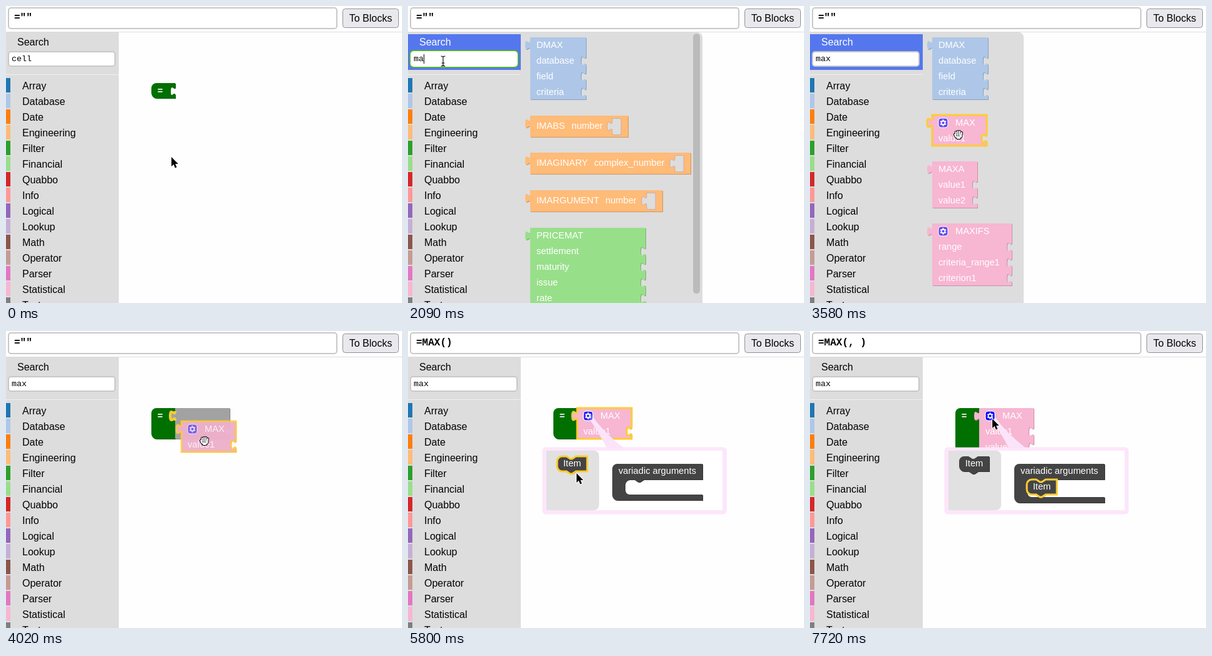
Recreate the animation shown at these times as an HTML page with a canvas. Size 632x474 px, loop 8000 ms.

```html
<!DOCTYPE html>
<html lang="en">
<head>
<meta charset="utf-8">
<title>Formula blocks</title>
<style>
html, body { margin: 0; width: 100%; height: 100%; overflow: hidden; background: #fff; }
canvas { display: block; width: 632px; height: 474px; }
</style>
</head>
<body>
<canvas id="stage" width="632" height="474"></canvas>
<script>
const ctx = document.getElementById('stage').getContext('2d');
const LOOP = 8000;
const SANS = '"Liberation Sans", Arial, sans-serif';
const MONO = '"Liberation Mono", "Courier New", monospace';
const BLOCK_FONT = `14.67px ${SANS}`;
const YELLOW = '#fc3', GREY = '#ddd', DARK = '#444';
const BLUE = '#aec7e8', ORANGE = '#ffbb78', LIME = '#98df8a', PINK = '#f7b6d2';

const categories = [
  ['Array', '#1f77b4'], ['Database', BLUE], ['Date', '#ff7f0e'],
  ['Engineering', ORANGE], ['Filter', '#2ca02c'], ['Financial', LIME],
  ['Quabbo', '#d62728'], ['Info', '#ff9896'], ['Logical', '#9467bd'],
  ['Lookup', '#c5b0d5'], ['Math', '#8c564b'], ['Operator', '#c49c94'],
  ['Parser', '#e377c2'], ['Statistical', PINK], ['Text', '#7f7f7f']
];

// Bursts of motion: first step, last step, number of steps.
const bursts = [[150, 1190, 8], [2680, 3580, 7], [3730, 4750, 8], [5500, 6540, 8], [6680, 7720, 8]];

// Key points: tick, x, y.
const cursorPath = [
  [0, 264, 241], [6, 56, 88], [8, 56, 88], [14, 236, 205], [15, 236, 205],
  [18, 316, 175], [19, 310, 166], [23, 289, 132], [26, 269, 227],
  [30, 374, 255], [32, 374, 255], [38, 291, 140], [39, 291, 140]
];
const maxPath = [[15, 195, 174], [18, 280, 144], [19, 270, 123]];
const itemPath = [[26, 238, 200], [30, 346, 237]];

const clamp = (v, lo, hi) => Math.min(hi, Math.max(lo, v));

function tickAt(t) {
  return bursts.reduce((sum, [from, to, n]) =>
    sum + clamp(Math.floor((t - from + 6) * (n - 1) / (to - from)) + 1, 0, n), 0);
}

function along(keys, tick) {
  const i = keys.findIndex(k => k[0] >= tick);
  if (i <= 0) return (i ? keys[keys.length - 1] : keys[0]).slice(1);
  const [a, b] = [keys[i - 1], keys[i]];
  const p = (tick - a[0]) / (b[0] - a[0]);
  const e = p * p * (3 - 2 * p);
  return [1, 2].map(k => Math.round(a[k] + (b[k] - a[k]) * e));
}

// Drawing helpers
function text(s, x, y, font, color = '#000', align = 'left') {
  ctx.font = font;
  ctx.fillStyle = color;
  ctx.textAlign = align;
  ctx.fillText(s, x, y);
}

function rect(x, y, w, h, color) {
  ctx.fillStyle = color;
  ctx.fillRect(x, y, w, h);
}

function round(x, y, w, h, r, fill, stroke, width = 1) {
  ctx.beginPath();
  ctx.roundRect(x, y, w, h, r);
  if (fill) { ctx.fillStyle = fill; ctx.fill(); }
  if (stroke) { ctx.strokeStyle = stroke; ctx.lineWidth = width; ctx.stroke(); }
}

function at(x, y, draw) {
  ctx.save();
  ctx.translate(x, y);
  draw();
  ctx.restore();
}

function strokePath(path, color, width) {
  ctx.strokeStyle = color;
  ctx.lineWidth = width;
  ctx.stroke(path);
}

// Block outlines
const TAB_DOWN = 'c0,10 -8,-8 -8,7.5s8,-2.5 8,7.5';
const TAB_UP = 'c0,-10 -8,8 -8,-7.5s8,2.5 8,-7.5';
const TOP_LEFT = 'M0,8a8,8 0 0 1 8,-8';
const NOTCH_BACK = 'l-6,4h-3l-6,-4';

function valuePath(w, rows, h = rows * 25 - 1) {
  let d = `M0,0H${w}`;
  for (let i = 1; i < rows; i++) d += `V${i * 25 + 5}${TAB_DOWN}`;
  return new Path2D(`${d}V${h}H0V20${TAB_UP}Z`);
}

const equalsPath = h => new Path2D(`${TOP_LEFT}H38V5${TAB_DOWN}V${h}H8a8,8 0 0 1 -8,-8Z`);
const itemShape = new Path2D(
  `${TOP_LEFT}H15l6,4h3l6,-4H48V24H30${NOTCH_BACK}H8a8,8 0 0 1 -8,-8Z`);
const listPath = n => new Path2D(
  `${TOP_LEFT}H144V25H50${NOTCH_BACK}H28a8,8 0 0 0 -8,8v${n - 16}a8,8 0 0 0 8,8` +
  `H144v9H8a8,8 0 0 1 -8,-8Z`);
const holePath = new Path2D(`M0,0h14v26h-14V20${TAB_UP}Z`);
const socketPath = new Path2D(`M0,0${TAB_DOWN}`);

function shape(path, color, selected) {
  ctx.fillStyle = color;
  at(1, 1, () => {
    ctx.fill(path);
    ctx.fillStyle = 'rgba(0,0,0,.2)';
    ctx.fill(path);
  });
  ctx.fillStyle = color;
  ctx.fill(path);
  if (selected) strokePath(path, YELLOW, 3);
}

function gear(x, y, hover) {
  at(x, y, () => {
    round(-7.5, -7.5, 15, 15, 4, hover ? '#00f' : 'rgba(0,0,255,.6)', '#fff');
    ctx.strokeStyle = '#fff';
    ctx.lineWidth = 1.8;
    ctx.beginPath();
    ctx.arc(0, 0, 3, 0, 7);
    for (let i = 0; i < 6; i++) {
      const c = Math.cos(i * Math.PI / 3 + .52), s = Math.sin(i * Math.PI / 3 + .52);
      ctx.moveTo(c * 3, s * 3);
      ctx.lineTo(c * 5.2, s * 5.2);
    }
    ctx.stroke();
  });
}

function valueBlock(x, y, w, color, labels, { icon, selected, hover } = {}) {
  at(x, y, () => {
    shape(valuePath(w, labels.length), color, selected);
    labels.forEach((s, i) =>
      text(s, icon && !i ? 37 : 10, 17 + i * 25, BLOCK_FONT, '#fff'));
    if (icon) gear(17.5, 12.5, hover);
  });
}

function inlineBlock(y, w, name, arg, argX) {
  at(195, y, () => {
    shape(valuePath(w, 1, 34), ORANGE);
    text(name, 10, 21, BLOCK_FONT, '#fff');
    text(arg, argX, 21, BLOCK_FONT, '#fff');
    at(w - 25, 4.5, () => {
      ctx.fillStyle = GREY;
      ctx.fill(holePath);
      strokePath(holePath, 'rgba(120,90,150,.25)', 1);
    });
  });
}

const maxBlock = (x, y, rows, opts) =>
  valueBlock(x, y, 87, PINK, ['MAX', 'value1', 'value2'].slice(0, rows), { icon: true, ...opts });

function item(x, y, selected) {
  at(x, y, () => {
    shape(itemShape, DARK, selected);
    text('Item', 24, 16, BLOCK_FONT, '#fff', 'center');
  });
}

// Scene parts
function topBar(formula) {
  rect(0, 0, 632, 41, '#fff');
  rect(0, 41, 632, 1, GREY);
  round(4, 3, 524, 33, 4, '#fff', '#c8c8c8', 2);
  text(formula, 13, 23, `bold 16px ${MONO}`);
  round(537.5, 4.5, 89, 30, 4, '#e9e9ed', '#8f8f9d');
  text('To Blocks', 582, 25, `16px ${SANS}`, '#000', 'center');
}

function sidebar({ query, active, focused, marked, caret, x, y }) {
  const font = `16px ${SANS}`;
  const hover = 'rgba(255,255,255,.2)';
  rect(0, 42, 180, 432, GREY);
  if (active) rect(0, 45, 180, 57, '#57e');
  else if (x < 180 && y >= 45 && y < 102) rect(0, 45, 180, 57, hover);
  text('Search', 18, 63, font, active ? '#fff' : '#000');
  if (focused) round(3, 71, 173, 27, 6, '#fff', '#53ad3b', 2);
  else round(4, 73, 170, 23, 4, '#fff', '#c8c8c8', 2);
  if (marked) rect(9, 77, 32, 15, '#d0eec6');
  text(query, 9, 88, `13.33px ${MONO}`);
  if (caret) rect(9 + query.length * 8, 77, 1, 15, '#000');
  rect(0, 109, 180, 1, '#f0f0f0');
  categories.forEach(([name, color], i) => {
    const top = 115 + i * 25;
    if (x < 180 && y >= top && y < top + 22) rect(0, top, 180, 22, hover);
    rect(0, top, 7, 23, color);
    text(name, 26, top + 18, font);
  });
}

function flyout(kind, selected) {
  const wide = kind === 'ma';
  round(180, 42, wide ? 290 : 161, 440, [0, 8, 0, 0], GREY);
  valueBlock(195, 50, 89, BLUE, ['DMAX', 'database', 'field', 'criteria']);
  if (wide) {
    inlineBlock(175, 156, 'IMABS', 'number', 66);
    inlineBlock(234, 256, 'IMAGINARY', 'complex_number', 102);
    inlineBlock(294, 211, 'IMARGUMENT', 'number', 120);
    valueBlock(195, 354, 184, LIME, ['PRICEMAT', 'settlement', 'maturity', 'issue', 'rate', '']);
    round(455, 44, 11, 415, 5.5, '#bbb');
  } else {
    maxBlock(195, 174, 2, { selected });
    valueBlock(195, 248, 72, PINK, ['MAXA', 'value1', 'value2']);
    valueBlock(195, 347, 127, PINK,
      ['MAXIFS', 'range', 'criteria_range1', 'criterion1'], { icon: true });
  }
}

function equalsBlock(height) {
  at(232, 123, () => {
    shape(equalsPath(height), '#007000');
    text('=', 14, 17, `bold 14.67px ${SANS}`, '#fff', 'center');
    ctx.textAlign = 'center';
  });
}

function mutator(tick, hover) {
  const filled = tick >= 29;
  ctx.fillStyle = '#fbe4fa';
  ctx.fill(new Path2D('M288,134L293,134Q312,162 346,188H318Q306,165 288,138Z'));
  gear(287.5, 135.5, hover);
  round(215, 186, 293, 106, 5, '#fde6fb', '#f6dcf4', .6);
  rect(221, 191, 281, 95, '#fff');
  round(221, 191, 84, 95, [0, 8, 8, 0], '#e1e1e1');
  item(238, 200, tick === 26);
  at(326, 212, () => {
    shape(listPath(filled ? 28 : 24), DARK);
    text('variadic arguments', 10, 16, BLOCK_FONT, '#fff');
  });
  if (tick > 26) {
    if (filled && tick < 32) at(346, 237, () => shape(itemShape, '#a2a2a2'));
    ctx.globalAlpha = tick < 32 ? .8 : 1;
    item(...along(itemPath, tick), true);
    ctx.globalAlpha = 1;
  }
}

// Pointers
const arrow = new Path2D('M0,0V15l3.5,-3.2 2.4,5.6 2.6,-1.1 -2.4,-5.4h4.7z');
const beam = new Path2D('M-3,-8q3,0 3,2V6q0,2 -3,2M3,-8q-3,0 -3,2M0,6q0,2 3,2M-2,3H2');
const openHand = new Path2D('M-6,0L-2,5M-4,-4L-1,3M-1,-6V3M2,-6V3M5,-4L4,4M-1,5H3');
const closedHand = new Path2D('M-5,0L-3,4M-3,-4V2M0,-5V2M3,-5V2M6,-3L5,4M-2,4H4M-1,6H3');

function pointer(kind, x, y) {
  at(x, y, () => {
    ctx.lineCap = ctx.lineJoin = 'round';
    if (kind === 'arrow') {
      strokePath(arrow, '#fff', 2.2);
      ctx.fillStyle = '#000';
      ctx.fill(arrow);
    } else if (kind === 'beam') {
      strokePath(beam, '#fff', 2.5);
      strokePath(beam, '#000', 1.1);
    } else {
      const hand = kind === 'open' ? openHand : closedHand;
      strokePath(hand, '#000', 4.2);
      strokePath(hand, '#fff', 2.2);
    }
  });
}

function pointerKind(tick, x, y, onGear) {
  if (x < 175 && y >= 72 && y < 98) return 'beam';
  if ((tick >= 15 && tick <= 19) || (tick >= 27 && tick <= 31)) return 'closed';
  if (tick === 14 || (tick >= 20 && tick <= 22 && !onGear) || tick === 32 || tick === 33) return 'open';
  return 'arrow';
}

function draw(t) {
  const tick = tickAt(t);
  const [x, y] = along(cursorPath, tick);
  const onGear = tick > 19 && x >= 280 && x <= 295 && y >= 127 && y <= 143;
  const typing = t >= 2084;
  const kind = !typing || tick >= 16 ? '' : t < 2374 ? 'ma' : 'max';
  const dropped = tick >= 19, preview = tick === 18;
  const rows = tick >= 32 ? 3 : dropped || preview ? 2 : 1;
  const focused = tick >= 7 && tick < 15;

  rect(0, 0, 632, 474, '#fefefe');
  equalsBlock(rows * 25 - 1);
  if (preview) {
    at(270, 123, () => shape(valuePath(87, 2), '#a2a2a2'));
    at(270, 128, () => strokePath(socketPath, YELLOW, 4));
  }
  if (dropped) {
    maxBlock(270, 123, rows, { selected: tick < 27, hover: onGear });
  } else if (tick >= 16) {
    ctx.globalAlpha = .8;
    maxBlock(...along(maxPath, tick), 2, { selected: true });
    ctx.globalAlpha = 1;
  }
  if (t >= 5194) mutator(tick, onGear);
  sidebar({
    query: !typing ? 'cell' : t < 2224 ? 'ma' : 'max',
    active: !!kind, focused, marked: tick === 8 && !typing,
    caret: focused && typing, x, y
  });
  if (kind) flyout(kind, tick === 15);
  topBar(tick >= 32 ? '=MAX(, )' : dropped ? '=MAX()' : '=""');
  pointer(pointerKind(tick, x, y, onGear), x, y);
}

const start = performance.now();
function frame() {
  draw((performance.now() - start) % LOOP);
  requestAnimationFrame(frame);
}
frame();
</script>
</body>
</html>
```
